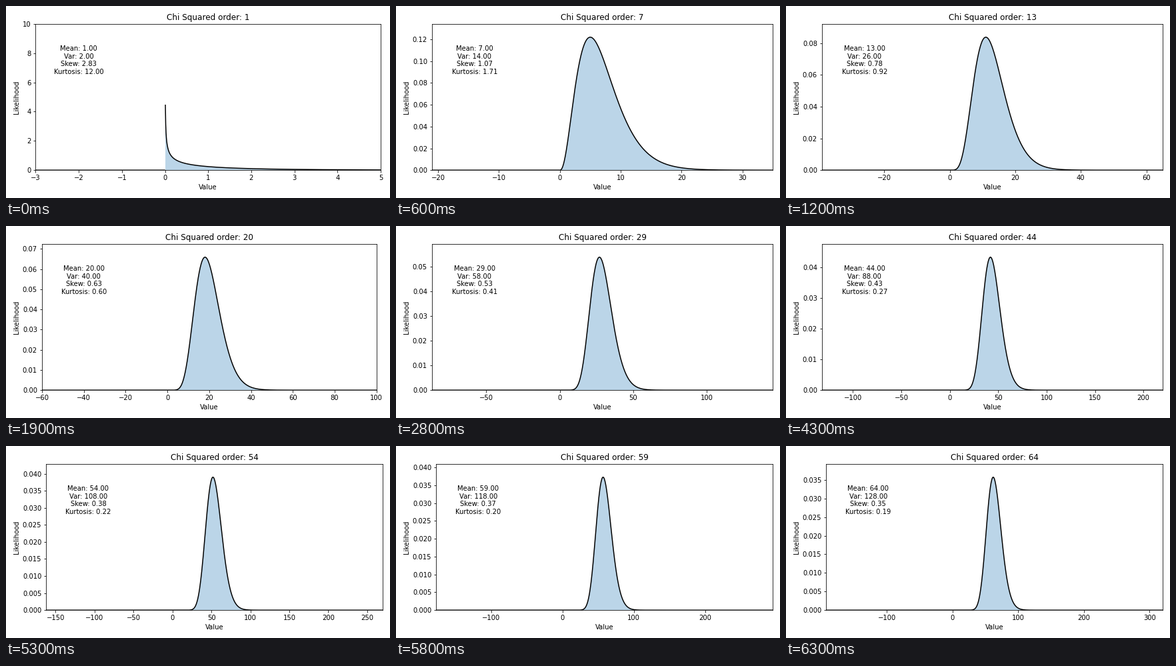
Animation of 576x288 px, one loop 6400 ms. Source, as a matplotlib script:

```python
import math

import matplotlib.pyplot as plt
import numpy as np
from matplotlib.animation import FuncAnimation

ORDERS = 64
INTERVAL = 100

plt.rcParams["font.family"] = "DejaVu Sans"
fig, ax = plt.subplots(figsize=(8, 4), dpi=72)


def chi_squared_pdf(x, k):
    """Density with order k; undefined at zero for k = 1."""
    pdf = np.zeros_like(x)
    pos = x > 0
    log_norm = k / 2 * math.log(2) + math.lgamma(k / 2)
    pdf[pos] = np.exp((k / 2 - 1) * np.log(x[pos]) - x[pos] / 2 - log_norm)
    if k <= 2:
        pdf[x == 0] = np.nan if k == 1 else 0.5
    return pdf


def summary(k):
    return (f"Mean: {k:.2f}\nVar: {2 * k:.2f}\n"
            f"Skew: {math.sqrt(8 / k):.2f}\nKurtosis: {12 / k:.2f}")


def draw(frame):
    k = frame + 1
    x = k * (np.arange(1001) - 375) / 125  # spans -3k to 5k, includes zero
    y = chi_squared_pdf(x, k)
    top = 10 if k == 1 else 1.1 * y.max()

    ax.clear()
    ax.plot(x, y, color="black")
    ax.fill_between(x, y, alpha=0.3)
    ax.set_xlim(-3 * k, 5 * k)
    ax.set_ylim(0, top)
    ax.set_title(f"Chi Squared order: {k}")
    ax.set_xlabel("Value")
    ax.set_ylabel("Likelihood")
    ax.text(-2 * k, 0.75 * top, summary(k), ha="center", va="center")

    # Start from the default margins so the layout depends on k alone.
    fig.subplots_adjust(left=0.125, right=0.9, bottom=0.11, top=0.88)
    fig.tight_layout()
    return ax.get_children()


anim = FuncAnimation(fig, draw, frames=ORDERS, interval=INTERVAL,
                     repeat=True, repeat_delay=0)
plt.show()
```
